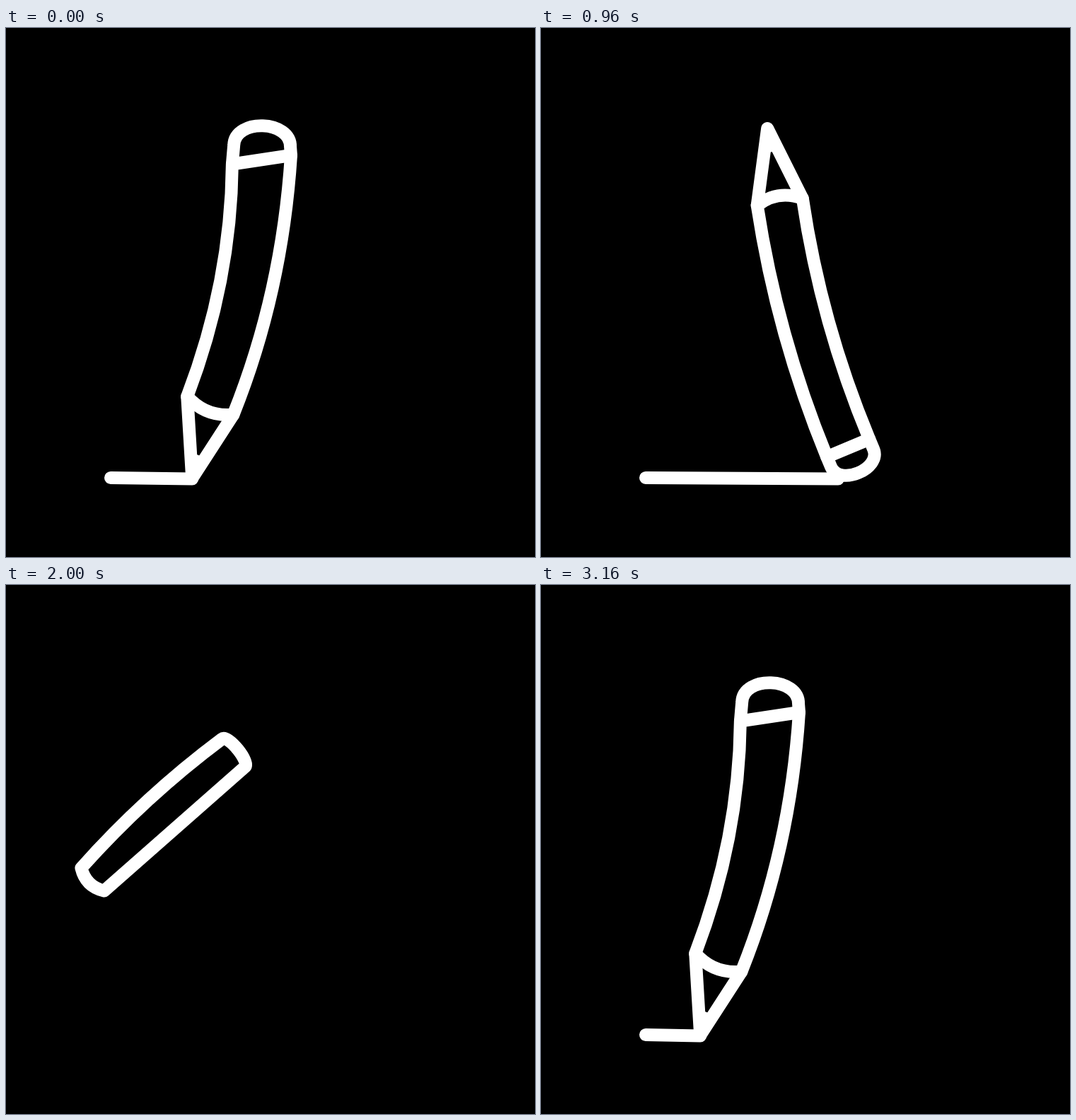
Write an HTML page with a canvas that moves like this. It is 748x748 px and loops after 3.2 s.

```html
<!DOCTYPE html>
<html lang="en">
<head>
<meta charset="utf-8">
<title>Pencil loop</title>
<style>
  html, body { margin: 0; width: 100%; height: 100%; overflow: hidden; background: #000; }
  canvas { display: block; width: 748px; height: 748px; }
</style>
</head>
<body>
<canvas id="stage" width="748" height="748"></canvas>
<script>
const ctx = document.getElementById('stage').getContext('2d');
const LOOP = 3200, STEP = 40;
const LINE_START = 148, LINE_END = 528;

// Moments of one cycle, counted on past the loop's end so that time only grows.
const POP = 1480, UNFOLD = 1720, SWING = 2240, ERASER = 2320, ATTACH = 2660;
const TIP = 2800, DRAW = 2986, LIFT = 3450, ERASE = 3760, EXIT = 4440;

const ramp = (t, from, to) => Math.max(0, Math.min(1, (t - from) / (to - from)));
const ease = (t, from, to) => {
  const s = ramp(t, from, to);
  return s * s * (3 - 2 * s);
};
const inOutQuad = s => s < 0.5 ? 2 * s * s : 1 - 2 * (1 - s) ** 2;
const radians = degrees => degrees * Math.PI / 180;

function poseAt(t) {
  const grown = ease(t, UNFOLD, 2180);
  const domed = ease(t, 2000, 2400);
  const capped = ease(t, 2560, 2700);
  const tipped = ease(t, TIP, 2960);
  const flipped = ease(t, LIFT - 10, ERASE + 20);
  const erasing = ease(t, ERASE, 4160);

  const angle = radians(113 - 165 * ease(t, 1820, SWING) + 63.8 * ease(t, SWING, 2550)
    + 156.7 * flipped - 4 * erasing);
  const upright = (1 + Math.cos(angle)) / 2;
  const p = {
    angle,
    x: 222 - 11 * ease(t, 2000, SWING) + 2 * capped
      + 402 * inOutQuad(ramp(t, DRAW, 3559)) - 92 * ease(t, 3500, ERASE)
      - 137 * (Math.max(0, t - ERASE) / 400) ** 2.55 - 160 * ease(t, 4320, EXIT),
    y: 327 + 14 * ease(t, SWING, 2400) + 19 * ease(t, TIP, DRAW)
      + 34.5 * ease(t, 3600, 3800) + 25.5 * erasing,
    len: 56 - 4 * ease(t, POP, 1560) + 326 * grown - 23 * ease(t, 2400, 2700) + 6 * flipped,
    width: 42 + 33 * ease(t, 1800, 2500) - 2 * flipped - 8 * erasing,
    bend: -3.5 * ease(t, UNFOLD, 2000) + 15 * ease(t, 2080, 2400) + 3.5 * tipped
      - 10 * flipped + 6 * erasing,
    belly: 5 * grown * (1 - capped),
    taper: 2.5 * grown * upright,
    dome: 20 * ramp(t, UNFOLD, 2400) * (1 - capped),
    collar: 7 * ease(t, UNFOLD, 2000) - 5 * domed + 7 * tipped,
    skew: 8 * (tipped * upright - domed * (1 - capped)),
    cap: t < ATTACH ? 0 : 48 - 10 * erasing,
    tip: 106 * tipped + 9 * flipped - 10 * erasing,
    side: -4 - 7 * (1 - upright),
  };
  p.reach = p.len / 2 + p.tip;
  p.tipX = p.x - Math.sin(angle) * p.reach + Math.cos(angle) * p.side;
  return p;
}

function stroke(draw) {
  ctx.beginPath();
  draw();
  ctx.stroke();
}

function drawPencil(p) {
  const phi = 4 * p.bend / p.len, cos = Math.cos(phi), sin = Math.sin(phi);
  const half = p.width / 2, end = p.len / 2;
  const top = (side, lift = 0, skew = 0) => {
    const w = side * (half + p.taper);
    return [w * cos - lift * sin, -end - w * sin - lift * cos - side * skew];
  };
  const bottom = (side, drop = 0) => {
    const w = side * (half - p.taper);
    return [w * cos - drop * sin, end + w * sin + drop * cos];
  };
  const [tl, tr] = [top(-1, 0, p.skew), top(1, 0, p.skew)];
  const [bl, br] = [bottom(-1), bottom(1)];
  const edgeTo = (from, to, side) =>
    ctx.quadraticCurveTo((from[0] + to[0]) / 2 + 2 * (p.bend + side * p.belly), 0, ...to);
  const dome = 1.33 * p.dome;

  ctx.save();
  ctx.translate(p.x, p.y);
  ctx.rotate(p.angle);

  stroke(() => {
    ctx.moveTo(...tl);
    ctx.bezierCurveTo(...top(-1, dome, p.skew), ...top(1, dome, p.skew), ...tr);
    edgeTo(tr, br, 1);
    ctx.quadraticCurveTo(...bottom(0, 2 * p.collar), ...bl);
    edgeTo(bl, tl, -1);
    ctx.closePath();
  });

  if (p.cap) {
    stroke(() => {
      ctx.moveTo(...tl);
      ctx.lineTo(...top(-1, 0.4 * p.cap));
      ctx.bezierCurveTo(...top(-1, 1.2 * p.cap), ...top(1, 1.2 * p.cap), ...top(1, 0.4 * p.cap));
      ctx.lineTo(...tr);
    });
  }

  if (p.tip > 1) {
    const point = [p.side, p.reach];
    const lead = corner => corner.map((v, i) => point[i] + (v - point[i]) * 0.32);
    stroke(() => {
      ctx.moveTo(...bl);
      ctx.lineTo(...point);
      ctx.lineTo(...br);
    });
    ctx.beginPath();
    ctx.moveTo(...point);
    ctx.lineTo(...lead(bl));
    ctx.lineTo(...lead(br));
    ctx.fill();
  }
  ctx.restore();
}

// The loose eraser pops up above the body, hops and lands on its top end.
function drawEraser(t, p) {
  const grow = ease(t, ERASER, 2480), fall = ease(t, 2400, ATTACH);
  const w = 70 * grow, h = 64 * grow - 16 * fall, seat = p.len / 2 + 24;
  const landX = p.x + Math.sin(p.angle) * seat, landY = p.y - Math.cos(p.angle) * seat;
  ctx.save();
  ctx.translate(157 + (landX - 157) * fall, 85.5 + (landY - 85.5) * fall - 65 * Math.sin(Math.PI * fall));
  ctx.rotate(radians(-5) * (1 - fall) + p.angle * fall);
  stroke(() => {
    ctx.moveTo(-w / 2, h / 2);
    ctx.lineTo(-w / 2, -h / 4);
    ctx.quadraticCurveTo(-w / 2, -h / 2, -w / 4, -h / 2);
    ctx.lineTo(w / 2, -h / 2);
    ctx.lineTo(w / 2, h / 2);
    ctx.closePath();
  });
  ctx.restore();
}

function drawLine(t, p) {
  const contact = t < LIFT ? p.tipX : t < ERASE ? LINE_END : p.x + 34;
  const end = Math.min(LINE_END, contact);
  if (t < DRAW || end < LINE_START) return;
  stroke(() => {
    ctx.moveTo(LINE_START, 636);
    ctx.lineTo(end, 637.5);
  });
}

function render(now) {
  const step = Math.floor((now % LOOP) / STEP) * STEP;
  const t = step < POP ? step + LOOP : step;
  ctx.fillStyle = '#000';
  ctx.fillRect(0, 0, 748, 748);
  if (t >= EXIT) return;
  ctx.fillStyle = ctx.strokeStyle = '#fff';
  ctx.lineWidth = 18;
  ctx.lineCap = ctx.lineJoin = 'round';
  const p = poseAt(t);
  drawLine(t, p);
  drawPencil(p);
  if (t > ERASER && t < ATTACH) drawEraser(t, p);
}

let start;
function tick(now) {
  start ??= now;
  render(now - start);
  requestAnimationFrame(tick);
}
render(0);
requestAnimationFrame(tick);
</script>
</body>
</html>
```
